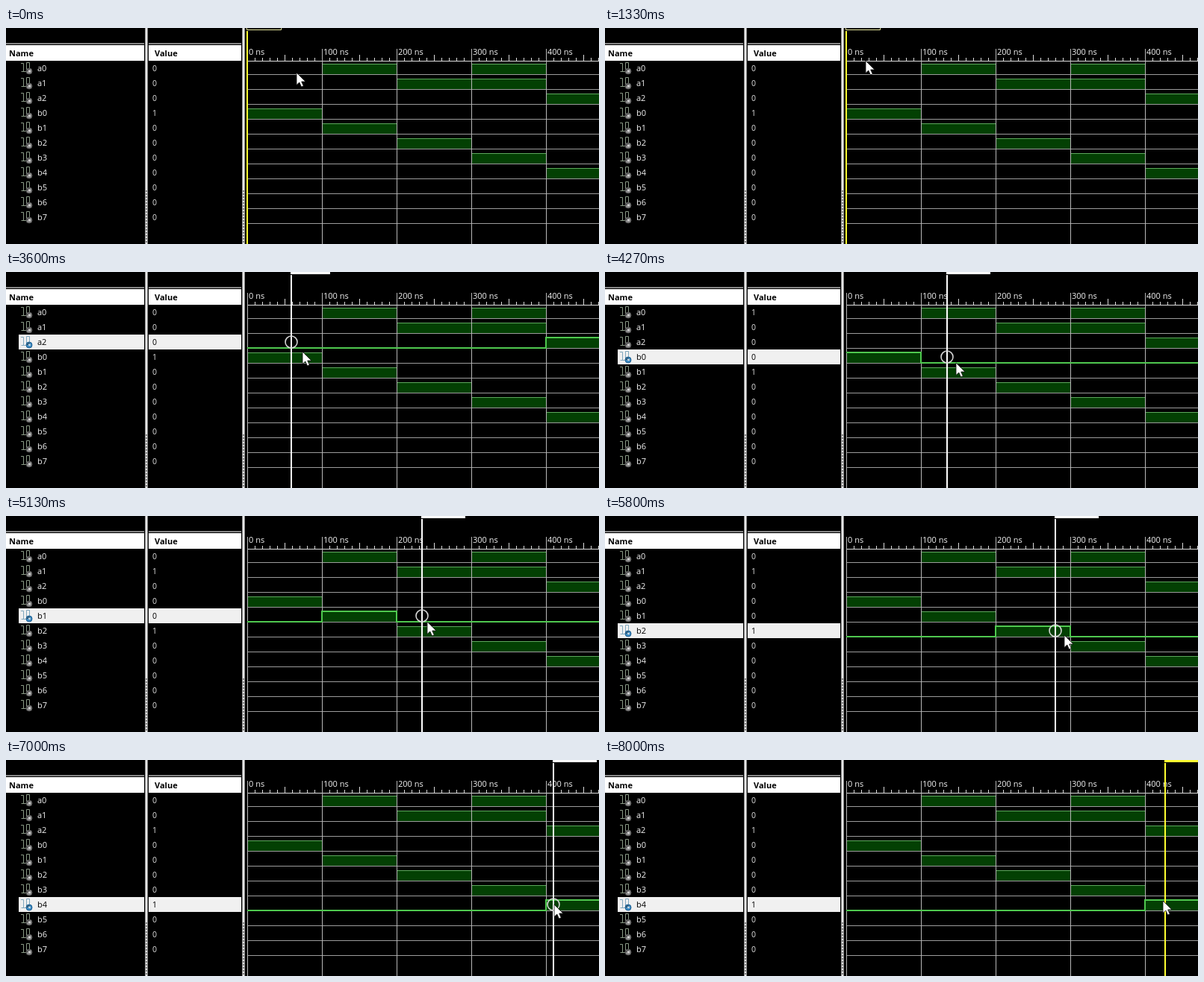
Write an HTML page that moves like this. It is 794 by 290 pixels and loops after 8070 ms.

```html
<!DOCTYPE html>
<html lang="en">
<head>
<meta charset="utf-8">
<title>Decoder waveform</title>
<style>
html, body { margin: 0; width: 100%; height: 100%; overflow: hidden; background: #000; }
svg { display: block; width: 794px; height: 290px; }
text { font: 11px "Open Sans", "Noto Sans", sans-serif; fill: #f4f4f4; }
.head { font-weight: bold; fill: #000; }
.value { font-size: 10.5px; fill: #ddd; }
.picked text { fill: #000; }
.wave { fill: none; stroke: #8a9a86; }
.ball { fill: #8c8c8c; stroke: #4c4c4c; }
.picked .wave { stroke: #7fa6bd; }
.picked .ball { fill: #3d8cc4; stroke: #1f5f90; }
.back { fill: #f0f0f0; visibility: hidden; }
.picked .back { visibility: visible; }
</style>
</head>
<body>
<svg id="stage" viewBox="0 0 794 290"></svg>
<script>
const stage = document.getElementById('stage');
const LOOP = 8070, STEP = 200 / 3;
const LEFT = 323, SLOT = 100;
const GRAB = 2130, DROP = 7730, LAG = 130;
const names = ['a0', 'a1', 'a2', 'b0', 'b1', 'b2', 'b3', 'b4', 'b5', 'b6', 'b7'];

function add(tag, attrs, parent = stage, content = '') {
  const el = document.createElementNS('http://www.w3.org/2000/svg', tag);
  set(el, attrs);
  el.textContent = content;
  parent.appendChild(el);
  return el;
}
function set(el, attrs) {
  for (const key in attrs) el.setAttribute(key, attrs[key]);
}
const rect = (x, y, width, height, fill, parent) =>
  add('rect', { x, y, width, height, fill, 'shape-rendering': 'crispEdges' }, parent);
const label = (x, y, content, cls = '', parent = stage) =>
  add('text', { x, y, class: cls }, parent, content);

// Signal level of a row in a 100 ns slot
const level = (row, slot) => row < 3 ? slot >> row & 1 : +(slot === row - 3);

function drawIcon(parent, y) {
  add('path', { class: 'wave', d: `M20 ${y - 6.5}h3.5v11h4v-12h4v8M27.5 ${y + 4.5}h-7` }, parent);
  add('circle', { class: 'ball', cx: 31, cy: y + 4, r: 4 }, parent);
  add('circle', { cx: 31.5, cy: y + 4, r: 1.3, fill: '#ddd' }, parent);
  add('path', { d: `M28.5 ${y + 4}a2.5 2.5 0 0 1 3-2.5`, fill: 'none', stroke: '#333' }, parent);
}

function drawPanels() {
  for (const [x, w, title, tx] of [[0, 185, 'Name', 4], [191, 124, 'Value', 199]]) {
    rect(x, 20, w, 2, '#858585');
    rect(x, 23, w, 21, '#fff');
    label(tx, 38, title, 'head');
  }
  for (const x of [186, 316]) {
    rect(x, 0, 4, 290, '#8f8f8f');
    rect(x + 1, 0, 2, 290, '#e6e6e6');
    for (let y = 218; y < 290; y += 4) rect(x + 1, y, 2, 2, '#858585');
  }
}

function drawRuler() {
  rect(LEFT, 44, 471, 1, '#dcdcdc');
  for (let i = 0; i * 10 + LEFT < 794; i++) {
    const size = i % 10 === 0 ? 16 : i % 5 === 0 ? 8 : 4;
    rect(LEFT + i * 10, 44 - size, 1, size, '#dcdcdc');
  }
  for (let s = 0; s < 5; s++) label(LEFT + 2 + s * SLOT, 36, `${s * 100} ns`);
}

function drawRow(name, row) {
  const y = 54 + row * 20;
  const group = add('g', {});
  for (const [x, w] of [[17, 168], [191, 124]])
    add('rect', { x, y: y - 10, width: w, height: 20, class: 'back' }, group);
  drawIcon(group, y);
  label(42, y + 4, name, '', group);
  const value = label(196, y + 4, '0', 'value', group);
  for (let s = 0; s < 5; s++) {
    if (!level(row, s)) continue;
    rect(LEFT + s * SLOT, y - 6, SLOT, 14, '#034003');
    rect(LEFT + s * SLOT, y - 6, SLOT, 1, '#5da85d');
  }
  rect(LEFT, y + 8, 471, 1, '#9c9c9c');
  return { group, value };
}

function wavePath(row) {
  const y = 54 + row * 20;
  let d = '';
  for (let s = 0; s < 5; s++) {
    const h = level(row, s) ? y - 6 : y + 8;
    d += `${s ? 'L' : 'M'}${LEFT + s * SLOT} ${h}h${SLOT}`;
  }
  return d;
}

drawPanels();
drawRuler();
const rows = names.map(drawRow);
for (let s = 0; s < 5; s++) rect(LEFT + s * SLOT, 28, 1, 262, '#b8b8b8');
const active = add('path', { fill: 'none', stroke: '#4fc84f', 'stroke-width': 2, 'shape-rendering': 'crispEdges' });
const marker = rect(0, 4, 2, 286, '#ff0');
const tag = rect(0, 0, 45, 3, '#ff0');
const tagBox = add('path', { d: 'M322.5 0V2.5H368.5V0', fill: '#000', stroke: '#e8e8a0' });
const ring = add('circle', { r: 8, fill: 'none', stroke: '#d4d4d4', 'stroke-width': 1.6 });
const pointer = add('path', {
  d: 'M0 0V16.5L3.8 13 6.5 19 9.3 17.8 6.7 12H12Z',
  fill: '#fff', stroke: '#111', 'stroke-width': .8
});

// Keys: [ms, value]
const mouseX = [[0, 389], [700, 380], [1300, 350], [2000, 325], [2330, 325], [2600, 335], [3600, 397],
  [5130, 564], [5800, 615], [7000, 734], [7500, 749], [8000, 747]];
const mouseY = [[0, 60], [700, 56], [1300, 44], [2000, 35], [2600, 35], [3600, 107],
  [5130, 142], [5800, 160], [7000, 194], [7500, 190], [8000, 189]];
const lineX = [[0, 323], [2330, 323], [2600, 334], [3600, 382], [5130, 557], [5800, 603],
  [7000, 733], [7500, 750]];

function at(keys, t) {
  const i = keys.findIndex(k => k[0] > t);
  if (i < 0) return keys[keys.length - 1][1];
  if (i === 0) return keys[0][1];
  const [t0, a] = keys[i - 1], [t1, b] = keys[i];
  return a + (b - a) * (t - t0) / (t1 - t0);
}

function render(t) {
  const x = Math.round(at(lineX, t));
  const grabbed = t >= GRAB, dragging = grabbed && t < DROP;
  const row = grabbed ? Math.floor((at(mouseY, t - LAG) - 44) / 20) : -1;
  const picked = row >= 0;
  const color = dragging ? '#fff' : '#ffff30';
  const slot = Math.floor((x - LEFT) / SLOT);

  rows.forEach((r, i) => {
    r.group.setAttribute('class', i === row ? 'picked' : '');
    r.value.textContent = level(i, slot);
  });
  set(active, { d: picked ? wavePath(row) : '' });
  set(marker, { x: x - 1, fill: color });
  const ns = x - LEFT;
  set(tag, { x: x - 1, width: ns < 10 ? 46 : ns < 100 ? 53 : 59, fill: color, visibility: grabbed ? 'visible' : 'hidden' });
  set(tagBox, { visibility: grabbed ? 'hidden' : 'visible' });
  set(ring, { cx: x, cy: 54 + row * 20, visibility: dragging && picked ? 'visible' : 'hidden' });
  set(pointer, { transform: `translate(${Math.round(at(mouseX, t))} ${Math.round(at(mouseY, t))})` });
}

function tick() {
  const t = performance.now() % LOOP;
  render(Math.floor((t + 4) / STEP) * STEP);
  requestAnimationFrame(tick);
}
tick();
</script>
</body>
</html>
```
